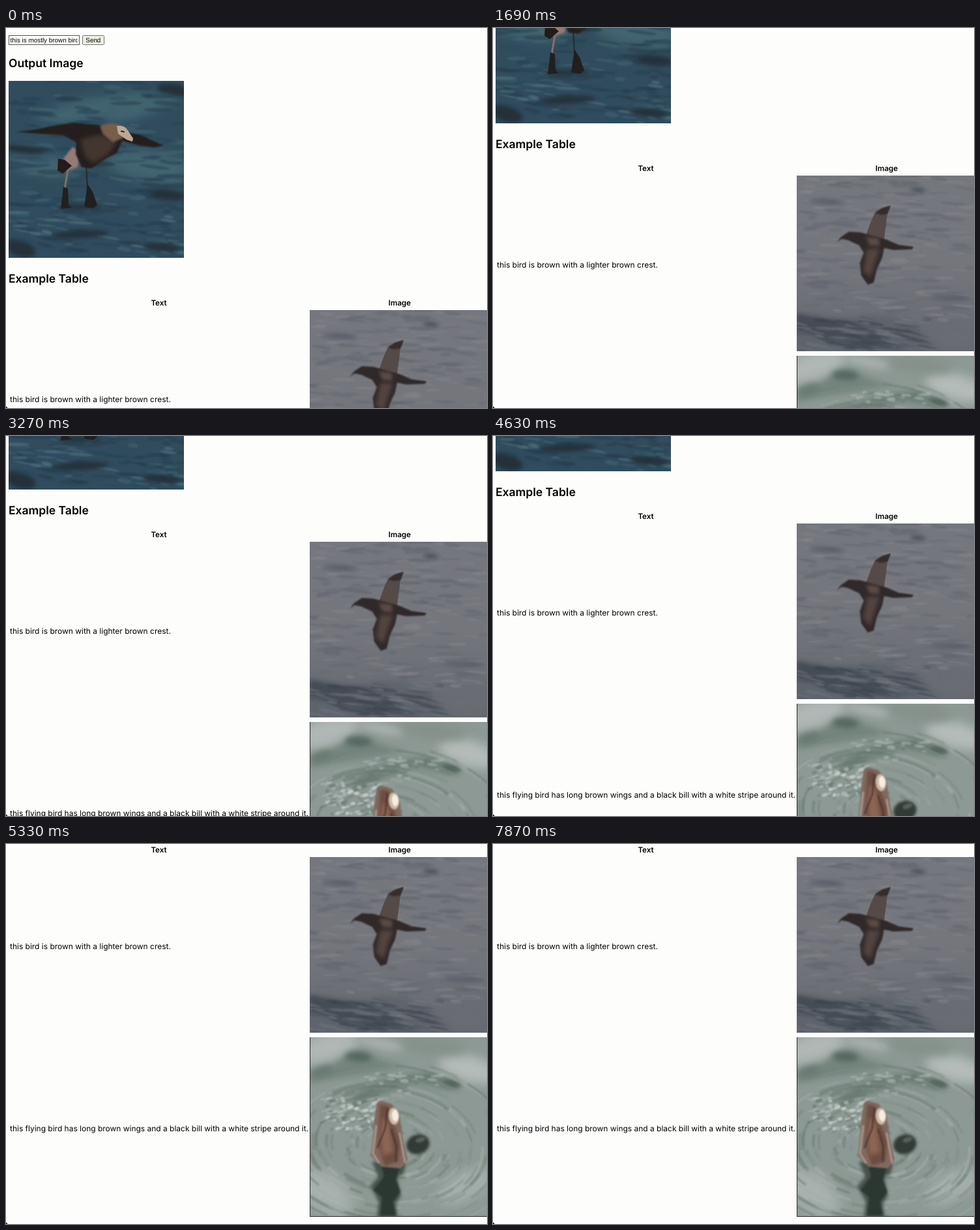
An HTML page with a canvas for the animation above (7.99 s loop, 738 by 582 pixels).

```html
<!DOCTYPE html>
<html lang="en">
<head>
<meta charset="utf-8">
<title>Bird search page</title>
<style>
  html, body { margin: 0; width: 100%; height: 100%; overflow: hidden; background: #fdfdfc; }
  #stage { position: relative; width: 738px; height: 582px; overflow: hidden; }
  #page { position: absolute; left: 0; top: 0; width: 738px; height: 1000px; will-change: transform; }
  #page > * { position: absolute; left: 0; top: 0; }
  #corner { position: absolute; left: 0; bottom: 0; width: 4px; height: 4px;
    background: radial-gradient(circle at 100% 0, transparent 3.6px, #111 4.2px); }
  text { font-family: Inter, sans-serif; font-size: 11.98px; fill: #000; text-rendering: geometricPrecision; }
  .title { font-size: 17.5px; font-weight: 600; }
  .head { font-size: 11.6px; font-weight: 600; text-anchor: middle; }
  .form { font: 9.9px "Liberation Sans", Arial, sans-serif; }
</style>
</head>
<body>
<div id="stage">
  <div id="page">
    <canvas id="photos" width="738" height="1000"></canvas>
    <svg width="738" height="1000">
      <clipPath id="field"><rect x="5" y="12" width="105" height="13"/></clipPath>
      <rect x="4.5" y="11.5" width="108" height="14" fill="#fdfdfc" stroke="#55554f"/>
      <text class="form" x="6.5" y="22" clip-path="url(#field)">this is mostly brown bird</text>
      <rect x="117.5" y="11.5" width="33" height="14" rx="1" fill="#efefe4" stroke="#77776c"/>
      <text class="form" x="122.3" y="22">Send</text>
      <text class="title" x="4" y="60">Output Image</text>
      <text class="title" x="4" y="390">Example Table</text>
      <text class="head" x="234.5" y="425">Text</text>
      <text class="head" x="604" y="425">Image</text>
      <text x="6" y="573">this bird is brown with a lighter brown crest.</text>
      <text x="6" y="852">this flying bird has long brown wings and a black bill with a white stripe around it.</text>
    </svg>
  </div>
  <div id="corner"></div>
</div>
<script>
const ctx = document.getElementById('photos').getContext('2d');
const page = document.getElementById('page');

function seeded(seed) {
  return () => (seed = (seed * 16807) % 2147483647) / 2147483647;
}

function shape(color, path, blur = 0.7) {
  ctx.filter = `blur(${blur}px)`;
  ctx.fillStyle = color;
  ctx.fill(new Path2D(path));
}

function line(color, width, path, blur = 0.6) {
  ctx.filter = `blur(${blur}px)`;
  ctx.strokeStyle = color;
  ctx.lineWidth = width;
  ctx.lineCap = 'round';
  ctx.stroke(new Path2D(path));
}

function blob(color, x, y, rx, ry, turn = 0, blur = 3) {
  ctx.filter = `blur(${blur}px)`;
  ctx.fillStyle = color;
  ctx.beginPath();
  ctx.ellipse(x, y, rx, ry, turn, 0, 7);
  ctx.fill();
}

// Scatters soft, nearly horizontal wave marks over a region.
function ripples(seed, count, colors, x, y, w, h, length, thick, tilt, alpha) {
  const rnd = seeded(seed);
  ctx.globalAlpha = alpha;
  for (let i = 0; i < count; i++) {
    const size = 0.4 + rnd();
    blob(colors[i % colors.length], x + rnd() * w, y + rnd() * h,
      length * size, thick * (0.5 + rnd()), tilt + (rnd() - 0.5) * 0.25, 1.2);
  }
  ctx.globalAlpha = 1;
}

// Lays short arcs along flattened rings around a centre.
function swirl(seed, count, colors, x, y, alpha) {
  const rnd = seeded(seed);
  ctx.globalAlpha = alpha;
  ctx.filter = 'blur(1.2px)';
  for (let i = 0; i < count; i++) {
    const radius = 34 + rnd() * 165;
    const from = rnd() * 7;
    ctx.strokeStyle = colors[i % colors.length];
    ctx.lineWidth = 1.5 + rnd() * 4;
    ctx.beginPath();
    ctx.ellipse(x, y, radius, radius * 0.66, 0.1, from, from + 0.15 + rnd() * 0.4);
    ctx.stroke();
  }
  ctx.globalAlpha = 1;
}

function photo(x, y, w, h, base, paint) {
  ctx.save();
  ctx.translate(x, y);
  ctx.beginPath();
  ctx.rect(0, 0, w, h);
  ctx.clip();
  ctx.fillStyle = base;
  ctx.fillRect(0, 0, w, h);
  paint(w, h);
  ctx.restore();
}

photo(4, 81, 269, 271, '#304c5d', (w, h) => {
  const light = '#426570';
  blob(light, 130, 42, 90, 17, -0.2, 9);
  blob(light, 205, 40, 60, 14, -0.3, 8);
  blob(light, 60, 130, 60, 14, 0.1, 8);
  blob(light, 215, 130, 65, 24, 0.15, 9);
  ripples(71, 170, ['#243e50', '#466873', '#2c4c61', '#273d49'], 0, 0, w, h, 18, 2.6, 0.05, 0.5);
  ripples(19, 85, ['#2a4d64', '#557681', '#273d49'], 0, 185, w, 86, 15, 2, 0.12, 0.55);
  const dark = '#24313a';
  blob(dark, 255, 14, 28, 9, 0.15);
  blob(dark, 26, 105, 30, 6, 0.1);
  blob(dark, 110, 235, 44, 6, -0.05);
  blob(dark, 245, 175, 28, 8, 0.1);
  blob(dark, 18, 257, 24, 12, 0.3);
  blob(dark, 235, 255, 30, 6, 0.1);
  blob(dark, 108, 193, 36, 4, 0);

  line('#866f69', 3, 'M103 115L91 135L86 166');
  line('#2a2829', 2, 'M119 128L121 165');
  shape('#211f20', 'M84 162L91 165L92 190L97 194L80 196L82 180Z');
  shape('#211f20', 'M121 158L129 170L136 190L130 195L116 193Z');
  shape('#957b73', 'M98 101L110 108L106 132L91 137L84 119Z', 1.5);
  shape('#211b1a', 'M76 119L86 121L97 130L83 142L75 137Z');
  shape('#241f1e', 'M11 78L38 75L72 68L101 64L142 68L177 78L203 83L238 99L224 102L201 99L174 92L166 110L146 121L127 134L112 132L103 112L104 94L84 83L49 81Z', 0.8);
  shape('#43362f', 'M110 90L140 82L166 92L154 111L131 126L118 117Z', 3);
  shape('#765d4c', 'M140 69Q158 61 176 69L184 81L174 88L160 94L145 82Z', 1.5);
  shape('#bda893', 'M166 69Q178 67 183 76L191 88L190 93L181 90L168 81Z');
  line('#2b2320', 2, 'M173 77L177 78');
});

photo(466, 432, 272, 269, '#72747b', (w, h) => {
  const wash = ctx.createLinearGradient(0, 0, 0, h);
  wash.addColorStop(0, '#75777e');
  wash.addColorStop(0.5, '#74767c');
  wash.addColorStop(1, '#65686f');
  ctx.fillStyle = wash;
  ctx.fillRect(0, 0, w, h);
  ripples(137, 230, ['#62656e', '#838488', '#676a73', '#7b7d81'], 0, 0, w, 225, 17, 2, 0.03, 0.6);
  blob('#4d525d', 186, 22, 12, 4, 0.1);
  blob('#595d67', 45, 40, 28, 4, 0.05);
  blob('#5b5f69', 236, 188, 30, 4, 0.05);
  shape('#5e636c', 'M0 210Q60 222 105 216T190 240L272 269H0Z', 4);
  shape('#464c56', 'M0 211L43 220L92 225L64 234L128 248L168 266L85 260L0 237Z', 3);
  ripples(53, 75, ['#3c434d', '#71767c', '#515862'], 0, 218, 205, 51, 17, 2, 0.18, 0.6);
  shape('#696c72', 'M182 239L272 224V269H224Z', 8);

  shape('#564a48', 'M106 92L114 70L120 57L131 50L144 46L139 59L137 76L133 105Z');
  shape('#352d2d', 'M120 57L131 50L144 46L139 59L128 60Z', 1);
  shape('#302929', 'M62 102L68 94L80 86L98 87L119 93L138 98L156 106L179 109L177 113L148 114L134 111L131 126L123 143L118 164L109 167L99 153L97 134L103 118L96 107L79 99L69 97Z', 0.8);
  shape('#53443f', 'M108 112L128 112L120 133L113 156L102 146Z', 3);
  shape('#5c4a46', 'M106 94L126 96L127 108L112 107Z', 2.5);
});

photo(466, 708, 272, 275, '#8c9994', (w, h) => {
  blob('#b0b8b6', 24, 16, 55, 22, -0.3, 9);
  blob('#b4bbb9', 244, 48, 48, 20, 0.25, 8);
  blob('#a8b2ae', 24, 238, 50, 28, 0.65, 10);
  blob('#a5b0ac', 240, 228, 46, 20, -0.5, 9);
  blob('#a9b1ae', 110, 10, 36, 8, 0.2, 6);
  blob('#85918a', 190, 14, 50, 13, 0.1, 7);
  shape('#74857d', 'M0 57Q37 45 58 25Q76 15 96 27Q127 44 153 43L110 52L46 62L0 70Z', 5);
  blob('#53665f', 75, 30, 20, 7, 0.05, 4);
  blob('#687a72', 18, 52, 18, 8, -0.3, 5);
  shape('#6c7e75', 'M70 87Q112 56 185 54L232 70L217 81L163 69L110 88L62 107Z', 5);
  blob('#54675d', 218, 71, 15, 6, 0.2, 3);
  swirl(91, 190, ['#728279', '#a9b3af', '#7f8e87', '#9ca8a3', '#66776e'], 122, 165, 0.5);
  ripples(29, 80, ['#d4d9d7', '#687a70', '#b4beb9'], 18, 92, 92, 50, 5, 2, -0.3, 0.7);
  ripples(43, 34, ['#667970', '#b6bfbb'], 85, 55, 120, 30, 7, 2, 0, 0.5);

  shape('#46524b', 'M96 190L148 193L144 209L134 214L140 243L132 255L135 275H103L106 252L93 228L105 214Z', 2.5);
  shape('#2b3832', 'M110 198H139L132 218L139 237L128 252L132 273H108L111 245L98 234L114 213Z', 1.5);
  blob('#323b36', 166, 164, 18, 15, -0.3, 2);
  blob('#55615b', 170, 157, 8, 4, -0.3, 1.5);
  shape('#806a5f', 'M103 101L109 97L115 99L126 102L138 121L143 155L150 187L140 201L110 198L94 181L97 154L99 125Z', 1);
  shape('#6d4d41', 'M108 103L121 105L128 132L139 160L136 190L115 197L105 164Z', 2);
  shape('#8d6553', 'M112 122L122 133L128 176L112 181L108 151Z', 3);
  line('#ab978b', 3, 'M102 136L97 178L106 192M138 147L143 174L146 191', 1);
  line('#453630', 2, 'M119 109L116 139L104 169M125 141L133 167L132 190', 1);
  blob('#cdb9a7', 129, 121, 8, 13, -0.1, 1.3);
  blob('#f5eee5', 131, 120, 5, 9, -0.1, 1);
  ctx.filter = 'none';
  ctx.fillStyle = '#272b29';
  ctx.fillRect(0, 0, 1, h);
  ctx.fillRect(0, h - 1, w, 1);
});

// Time in ms, scroll offset in px.
const LOOP = 7990;
const SCROLL = [
  [0, 0], [220, 0], [260, 4], [850, 86], [1690, 206],
  [3270, 270], [4630, 298], [5330, 412], [LOOP, 412]
];
const PAUSE = { from: 480, to: 730 };
const TICK = 20;

const speeds = SCROLL.slice(1).map(([t, y], i) => (y - SCROLL[i][1]) / (t - SCROLL[i][0]));

// The harmonic mean of neighbouring speeds keeps the curve free of overshoot.
function tangent(i) {
  const a = speeds[i - 1] || 0;
  const b = speeds[i] || 0;
  return a && b ? 2 * a * b / (a + b) : 0;
}

function scrollAt(time) {
  const i = SCROLL.findIndex(point => point[0] > time) - 1;
  const [t0, y0] = SCROLL[i];
  const [t1, y1] = SCROLL[i + 1];
  const span = t1 - t0;
  const u = (time - t0) / span;
  return y0 + (y1 - y0) * u * u * (3 - 2 * u)
    + span * u * (1 - u) * (tangent(i) * (1 - u) - tangent(i + 1) * u);
}

const start = performance.now();
function draw(now) {
  const time = Math.max(0, now - start) % LOOP;
  const ticked = Math.max(0, Math.floor((time - 10) / TICK) * TICK + 10);
  const paused = ticked >= PAUSE.from && ticked < PAUSE.to;
  page.style.transform = `translateY(${-Math.round(scrollAt(paused ? PAUSE.from : ticked))}px)`;
  requestAnimationFrame(draw);
}
draw(start);
</script>
</body>
</html>
```
